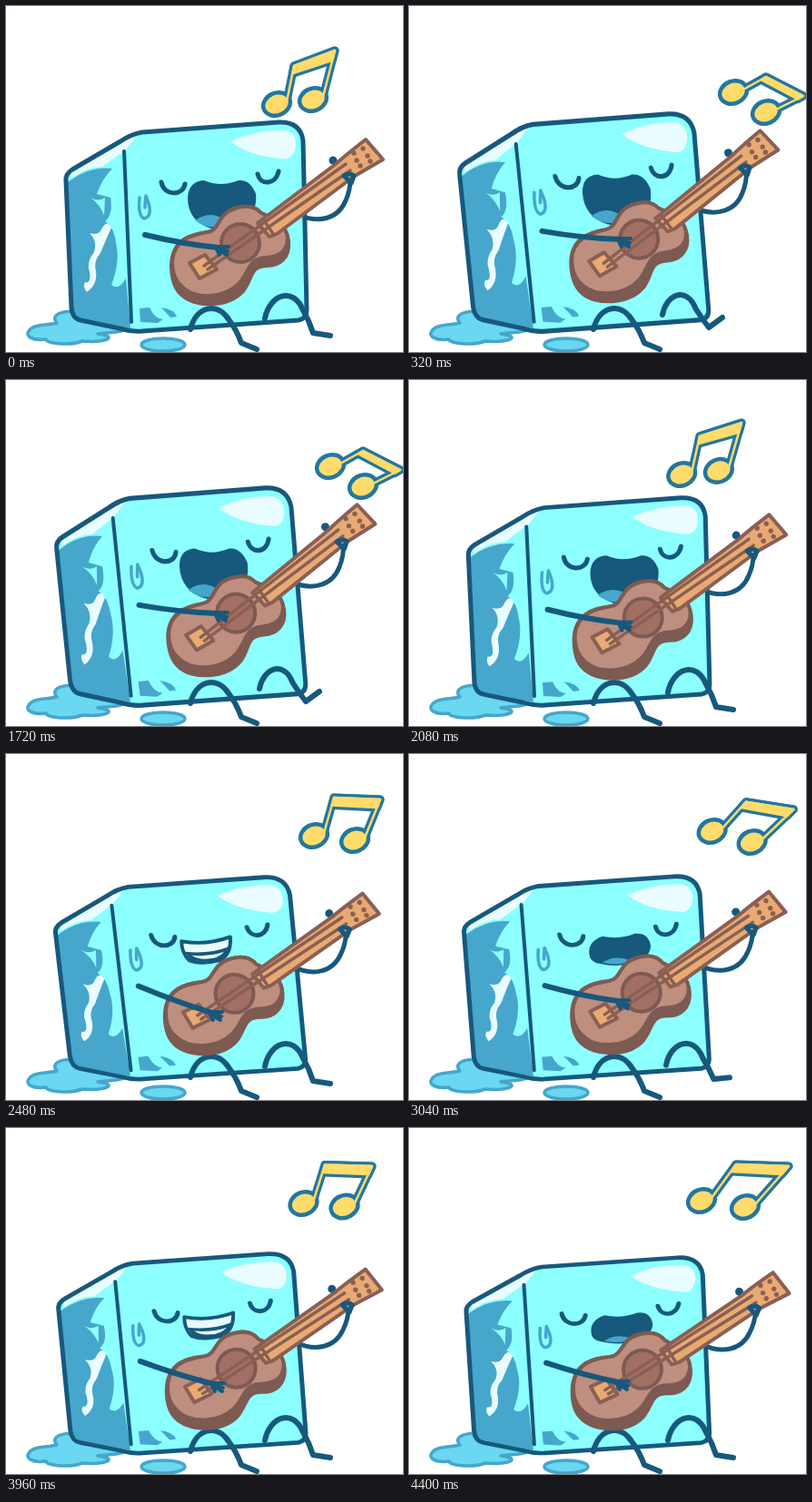
Write an HTML page that moves like this. It is 437 px wide and 381 px high and loops after 4440 ms.

```html
<!DOCTYPE html>
<html>
<head>
<meta charset="utf-8">
<title>Singing ice cube</title>
<style>
html, body { margin: 0; height: 100%; overflow: hidden; background: #fff }
svg { display: block; width: 437px; height: 381px }
path, ellipse, circle { stroke-linecap: round; stroke-linejoin: round }
.ink { fill: none; stroke: #17587d; stroke-width: 5 }
.blob { fill: #17587d; stroke: none }
.shade { fill: #46a6cb }
.wet { fill: #69d8f0; stroke: #46a6cb; stroke-width: 3.5 }
.white { fill: #e9fcff }
.wood { fill: #be8e7f; stroke: #7d5a52; stroke-width: 4 }
.neck { fill: #e8aa72; stroke: #8a5f54; stroke-width: 4 }
.string { fill: none; stroke: #8a5f54; stroke-width: 3.5 }
</style>
</head>
<body>
<svg viewBox="0 0 437 381">
  <!-- puddles -->
  <path class="wet" d="M56 349C48 340 62 334 82 337L135 349C137 361 112 359 101 361C125 364 110 371 84 369C68 375 43 371 44 367C28 369 21 363 25 358C30 350 44 352 56 349Z"/>
  <ellipse class="wet" cx="173" cy="373" rx="24" ry="7"/>

  <g class="guitar">
    <path class="ink" d="M322 230C345 240 366 234 374 214Q379 203 379 191"/>
    <circle class="blob" cx="360" cy="170" r="4.5"/>
  </g>

  <g id="cube">
    <path fill="#8cffff" d="M66 193Q65 185 73 180L126 149Q138 141 150 139L300 128Q324 127 327 148L331 335Q331 344 322 346L150 358Q138 359 125 355L82 346Q73 344 72 332Z"/>
    <path class="white" d="M72 184L126 151Q134 145 144 143L132 158L106 177Q88 177 72 190Z"/>
    <path class="shade" d="M68 194Q92 176 117 179Q106 190 100 207L115 211Q118 230 109 237Q119 243 121 261Q126 281 116 307Q124 314 132 300L137 355L84 345Q75 342 74 332Z"/>
    <path fill="#8cffff" d="M93 211Q101 216 109 211L108 231Q104 219 93 211Z"/>
    <path class="white" d="M92 250Q102 253 105 246Q111 234 116 244Q110 257 104 272Q96 281 99 292Q101 307 89 315Q84 309 87 304Q94 306 92 293Q88 282 97 271Q101 259 92 250Z"/>
    <path class="white" d="M247 149Q276 136 306 137Q319 138 319 153Q317 171 302 168Q267 165 247 149Z"/>
    <path class="shade" d="M147 333L158 332Q164 345 173 345L167 349L148 348ZM171 332Q185 334 188 342L181 343Z"/>
    <path d="M147 211Q145 231 152 234Q161 232 157 217L154 209Q153 218 153 222" fill="none" stroke="#46a6cb" stroke-width="3.5"/>
    <path class="ink" d="M66 193Q65 185 73 180L126 149Q138 141 150 139L300 128Q324 127 327 148L331 335Q331 344 322 346L150 358Q138 359 125 355L82 346Q73 344 72 332Z"/>
    <path class="ink" style="stroke-width:4" d="M130 160L138 348"/>
    <path class="ink" d="M171 194C174 210 195 209 197 196M277 185C280 198 297 197 300 182"/>
    <g id="open">
      <path class="blob" d="M200 211Q201 193 218 192Q236 200 256 192Q269 191 275 207Q277 227 262 236Q248 248 226 245Q200 237 200 211Z"/>
      <path class="shade" d="M208 236Q230 222 246 241Q223 248 208 236Z"/>
    </g>
    <g id="small">
      <path class="blob" d="M203 216Q202 202 218 196Q237 200 254 193Q269 191 271 207Q269 221 254 226Q233 232 214 227Q203 225 203 216Z"/>
      <path class="shade" d="M217 226Q232 216 249 224Q234 230 217 226Z"/>
    </g>
    <g id="grin">
      <path d="M204 201Q231 206 258 196Q258 217 243 223Q224 228 211 223Q203 214 204 201Z" fill="#e9fcff" stroke="#17587d" stroke-width="4"/>
      <path class="blob" d="M207 213Q234 216 256 207Q254 219 242 222Q224 227 212 222Z"/>
      <path class="white" d="M214 217Q232 219 250 213Q243 221 231 221Q221 222 214 217Z"/>
    </g>
  </g>

  <path class="ink" style="stroke-width:6" d="M203 356C209 331 232 325 245 345Q254 357 259 371L276 378"/>
  <path class="ink" style="stroke-width:6" id="leg"/>

  <g class="guitar">
    <path fill="#7d5a52" stroke="#7d5a52" stroke-width="4" d="M182 285C183 257 204 251 222 249C236 247 232 229 252 223C264 219 274 220 281 228C292 233 309 240 311 259C313 278 300 286 288 286C268 286 272 300 261 314C245 332 207 333 192 317C184 309 182 298 182 285Z"/>
    <path class="wood" d="M183 281C185 257 205 252 222 249C236 247 232 229 252 223C264 219 274 220 281 228C292 233 308 239 310 255C310 272 298 276 286 277C266 278 268 294 256 306C240 322 210 323 196 311C186 303 183 294 183 281Z"/>
    <circle cx="258" cy="261" r="21" fill="#a17062" stroke="#7d5a52" stroke-width="4"/>
    <path class="neck" d="M202 283L219 274L232 290L213 300Z"/>
    <path class="neck" d="M277 239L363 174Q374 164 396 147L415 169L384 187L298 251L290 254Z"/>
    <path class="string" d="M218 286L374 174M222 290L379 181M284 236L294 251"/>
    <g fill="#8a5f54">
      <circle cx="383" cy="162" r="2.7"/><circle cx="393" cy="157" r="2.7"/>
      <circle cx="386" cy="170" r="2.7"/><circle cx="398" cy="165" r="2.7"/>
      <circle cx="390" cy="176" r="2.7"/><circle cx="401" cy="171" r="2.7"/>
    </g>
    <path class="ink" d="M372 187Q379 183 383 187L380 195Z" fill="#17587d"/>
  </g>

  <path class="ink" style="stroke-width:6" id="arm"/>
  <path class="ink" style="stroke-width:4" id="fingers"/>
  <g id="note"></g>
</svg>
<script>
const LOOP = 4440, SWAY = 700;
const $ = id => document.getElementById(id);
const guitars = document.querySelectorAll('.guitar');

// time, lean, height, guitar x, y, turn, hand x, y, foot lift,
// then note heads and beam ends as x, y pairs
const poses = [
  [0, 0, 1, 0, 0, 0, 240, 269, 0, 298, 108, 338, 103, 317, 66, 362, 49],
  [60, -.022, .995, -1, 0, .8, 243, 269, 1, 318, 87, 362, 91, 350, 45, 403, 42],
  [200, -.018, .935, -2, 3, 3, 237, 283, 0, 322, 80, 370, 87, 360, 40, 418, 42],
  [320, -.063, 1.04, -4, -3, -2.3, 239, 260, 1, 357, 95, 393, 117, 393, 78, 434, 99],
  [380, -.07, .966, -7, 2, 1.5, 233, 288, 0, 339, 90, 384, 95, 361, 48, 412, 50],
  [540, -.03, .94, -3, 3, 2.5, 237, 282, 0, 316, 76, 361, 78, 341, 33, 394, 34],
];
poses.push([SWAY, ...poses[0].slice(1)]);

function poseAt(t) {
  const i = poses.findIndex(p => p[0] > t);
  const a = poses[i - 1], b = poses[i], u = (t - a[0]) / (b[0] - a[0]);
  return a.map((v, k) => v + (b[k] - v) * u);
}

function drawNote(h1x, h1y, h2x, h2y, t1x, t1y, t2x, t2y) {
  const drop = (t, h) => t + (h - t) * .2;
  const shape = `M${h1x + 11} ${h1y - 3}L${t1x} ${t1y}L${t2x} ${t2y}L${h2x + 11} ${h2y - 3}`;
  const beam = `M${t1x} ${t1y}L${t2x} ${t2y}L${drop(t2x, h2x + 11)} ${drop(t2y, h2y)}` +
    `L${drop(t1x, h1x + 11)} ${drop(t1y, h1y)}Z`;
  const layer = (color, w, grow) =>
    `<g fill="${color}" stroke="${color}" stroke-width="${w}">` +
    `<path d="${shape}" fill="none"/><path d="${beam}"/>` +
    [[h1x, h1y], [h2x, h2y]].map(([x, y]) =>
      `<ellipse stroke="none" rx="${13 + grow}" ry="${10 + grow}" transform="translate(${x} ${y}) rotate(-22)"/>`
    ).join('') + '</g>';
  $('note').innerHTML = layer('#2376a0', 9, 4.5) + layer('#ffdb6b', 2.5, 0);
}

function draw(now) {
  const t = Math.floor(now % LOOP / 40) * 40 % SWAY;
  const [, lean, tall, gx, gy, turn, hx, hy, lift, ...note] = poseAt(t);
  const floor = 355;
  $('cube').setAttribute('transform',
    `matrix(1 0 ${-lean} ${tall} ${lean * floor} ${floor * (1 - tall)})`);
  guitars.forEach(g => g.setAttribute('transform', `translate(${gx} ${gy}) rotate(${turn} 225 280)`));

  const mouth = t < 130 || t >= 260 && t < 350 || t >= 640 ? 'open'
    : t >= 350 && t < 490 ? 'grin' : 'small';
  for (const id of ['open', 'small', 'grin']) $(id).style.display = id == mouth ? '' : 'none';

  const up = (a, b) => a + (b - a) * lift;
  $('leg').setAttribute('d', `M${up(285, 279)} ${up(344, 340)}` +
    `C${up(290, 283)} 318 ${up(316, 305)} ${up(308, 307)} ${up(327, 316)} ${up(335, 334)}` +
    `Q${up(334, 323)} ${up(347, 345)} ${up(338, 330)} ${up(360, 354)}L${up(357, 345)} ${up(363, 343)}`);

  const sx = 153 + lean * 103, sy = floor - 103 * tall;
  $('arm').setAttribute('d', `M${sx} ${sy}Q${(sx + hx) / 2} ${(sy + hy) / 2 + 2} ${hx - 6} ${hy - 3}`);
  $('fingers').setAttribute('d',
    `M${hx - 6} ${hy - 4}L${hx + 5} ${hy - 4}M${hx - 6} ${hy - 2}L${hx + 4} ${hy + 1}` +
    `M${hx - 6} ${hy - 1}L${hx + 3} ${hy + 5}M${hx - 8} ${hy - 1}L${hx - 5} ${hy + 5}`);
  drawNote(...note);
}

const start = performance.now();
function tick() {
  draw(performance.now() - start);
  requestAnimationFrame(tick);
}
tick();
</script>
</body>
</html>
```
